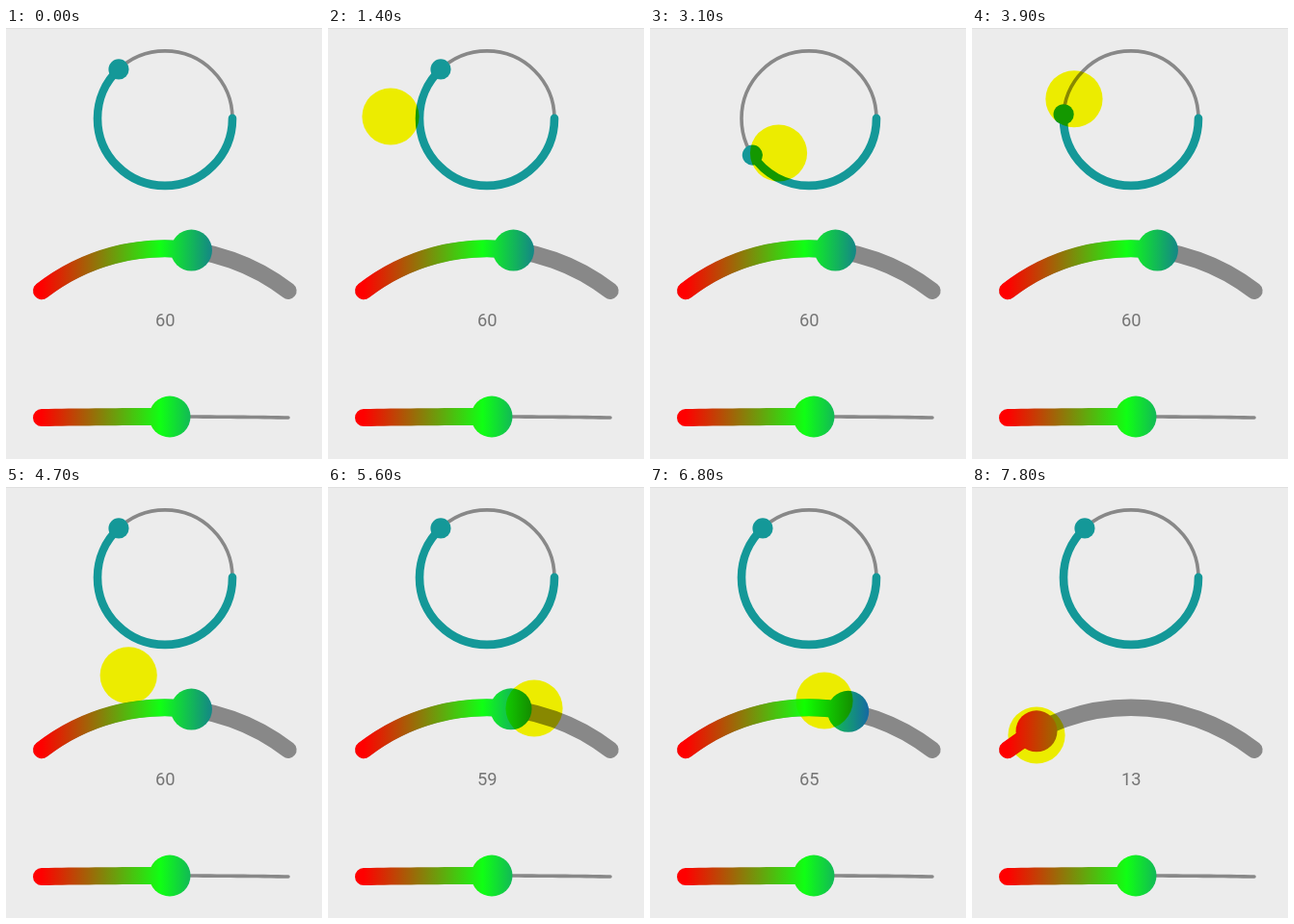
Write an HTML page with a canvas that moves like this. It is 328 px wide and 448 px high and loops after 8 s.

```html
<!DOCTYPE html>
<html lang="en">
<head>
<meta charset="utf-8">
<title>Seek bars</title>
<style>
html, body { margin: 0; width: 328px; height: 448px; overflow: hidden; background: #ececec; }
canvas { display: block; }
</style>
</head>
<body>
<canvas id="stage" width="328" height="448"></canvas>
<script>
const ctx = document.getElementById('stage').getContext('2d');
const LOOP = 8000, STEP = 100, TAU = Math.PI * 2, DEG = Math.PI / 180;
const GREY = '#888', TEAL = '#149898';
const ring = { x: 165, y: 93.9, r: 70, rest: 226.7 * DEG };
const bow = { x: 165, y: 437.5, r: 208.2, half: 37.9 * DEG, rest: 0.6 };

// Turning points of the finger on the bow: time, x, y
const drag = [
  [5400, 166, 226], [5600, 214, 230], [6400, 280, 252], [6800, 181, 222],
  [7200, 62, 256], [7500, 148, 232], [7700, 67, 258]
];

const mix = (a, b, k) => a + (b - a) * k;
const progress = (t, from, to) => Math.min(1, Math.max(0, (t - from) / (to - from)));
const between = (a, b, k) => ({ x: mix(a.x, b.x, k), y: mix(a.y, b.y, k) });

// Swing along the ring: 1 at the grip, 0 at the far end, closer to the centre there
function onRing(swing) {
  const a = mix(102, 224, swing) * DEG, r = 46 + 26 * swing ** 2;
  return { x: ring.x + r * Math.cos(a), y: ring.y + 0.5 + r * Math.sin(a) };
}

function onBow(t) {
  const i = drag.findIndex(p => p[0] > t);
  const [t1, x1, y1] = drag.at(i);
  if (i < 1) return { x: x1, y: y1 };
  const [t0, x0, y0] = drag[i - 1], k = progress(t, t0, t1);
  return { x: mix(x0, x1, k), y: mix(y0, y1, k) };
}

function finger(t) {
  const grip = onRing(1);
  if (t < 2200) return between({ x: 65, y: 92 }, grip, progress(t, 1400, 2000));
  if (t < 3270) return onRing(1 - progress(t, 2200, 3270) ** 1.6);
  if (t < 4200) return onRing(progress(t, 3270, 4060));
  if (t < 4800) {
    const k = progress(t, 4200, 4800), p = between(grip, { x: 166, y: 226 }, k);
    p.x -= 60 * Math.sin(Math.PI * k);
    return p;
  }
  return onBow(t);
}

// Thumbs trail the finger by one step
function ringAngle(t) {
  if (t <= 2200 || t >= 4200) return ring.rest;
  const p = finger(t - STEP);
  return (Math.atan2(p.y - ring.y, p.x - ring.x) + TAU) % TAU;
}

function bowValue(t) {
  if (t <= 5500) return bow.rest;
  const a = Math.asin((finger(t - STEP).x - bow.x) / bow.r);
  return progress(a, -bow.half, bow.half);
}

const rainbow = ctx.createLinearGradient(37, 0, 270, 0);
rainbow.addColorStop(0, '#f00');
rainbow.addColorStop(0.53, '#10ff14');
rainbow.addColorStop(1, '#1808ff');

function arc(c, from, to, width, color) {
  ctx.beginPath();
  ctx.arc(c.x, c.y, c.r, from, to);
  ctx.lineWidth = width;
  ctx.strokeStyle = color;
  ctx.stroke();
}

function dot(x, y, r, color) {
  ctx.beginPath();
  ctx.arc(x, y, r, 0, TAU);
  ctx.fillStyle = color;
  ctx.fill();
}

function thumb(c, angle, r, color) {
  dot(c.x + c.r * Math.cos(angle), c.y + c.r * Math.sin(angle), r, color);
}

function drawRing(t) {
  const a = ringAngle(t);
  arc(ring, 0, TAU, 3.6, GREY);
  arc(ring, 0, a, 8.6, TEAL);
  thumb(ring, a, 10.6, TEAL);
}

function drawBow(t) {
  const v = bowValue(t), start = -Math.PI / 2 - bow.half;
  const a = start + 2 * bow.half * v;
  arc(bow, start, start + 2 * bow.half, 17.5, GREY);
  arc(bow, start, a, 18, rainbow);
  thumb(bow, a, 21.5, rainbow);
  ctx.fillStyle = '#757575';
  ctx.fillText(Math.round(v * 100), 165.3, 310);
}

function drawBar() {
  const y = x => 404 + ((x - 165) / 128) ** 2;
  const line = (to, width, color) => {
    ctx.beginPath();
    for (let x = 37; x < to; x += 7) ctx.lineTo(x, y(x));
    ctx.lineTo(to, y(to));
    ctx.lineWidth = width;
    ctx.strokeStyle = color;
    ctx.stroke();
  };
  line(293, 3.6, GREY);
  line(170, 18, rainbow);
  dot(170, y(170), 21.5, rainbow);
}

function drawFinger(t) {
  if (t < 1400) return;
  const p = finger(t);
  ctx.globalCompositeOperation = 'multiply';
  dot(p.x, p.y, 29.6, '#ff0');
  ctx.globalCompositeOperation = 'source-over';
}

function draw(t) {
  ctx.fillStyle = '#ececec';
  ctx.fillRect(0, 0, 328, 448);
  ctx.fillStyle = '#e0e0e0';
  ctx.fillRect(0, 0, 328, 1);
  ctx.lineCap = ctx.lineJoin = 'round';
  ctx.textAlign = 'center';
  ctx.font = '18.3px Roboto, sans-serif';
  drawRing(t);
  drawBow(t);
  drawBar();
  drawFinger(t);
}

const begin = performance.now();
function tick() {
  const t = (performance.now() - begin) % LOOP;
  draw(Math.floor(t / STEP) * STEP);
  requestAnimationFrame(tick);
}
tick();
</script>
</body>
</html>
```
